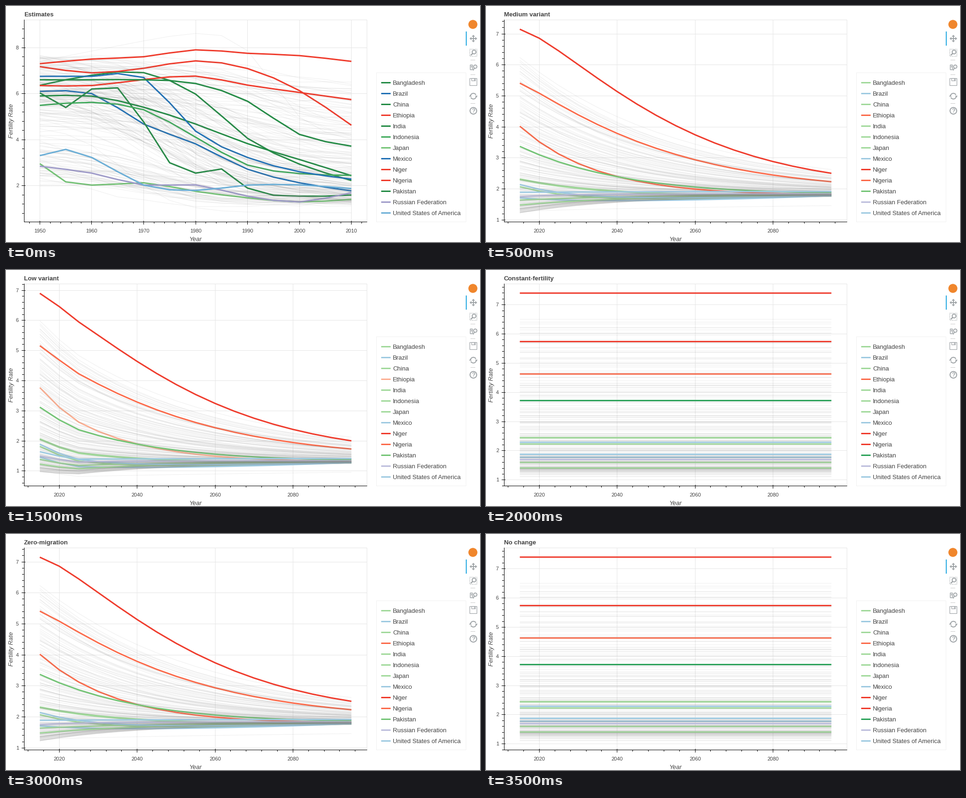
Animation, 1000 px wide and 500 px high, one loop 4000 ms. Source, as a matplotlib script:

```python
import numpy as np
import matplotlib.pyplot as plt
from matplotlib.animation import ArtistAnimation
from matplotlib.collections import LineCollection
from matplotlib.colors import to_rgba
from matplotlib.patches import Arc, Circle, Polygon, Rectangle

PAST = np.arange(1950, 2011, 5)
FUTURE = np.arange(2015, 2096, 5)
AHEAD = FUTURE - 2015
T = AHEAD / 80
TOP, RIGHT, BOTTOM = 29, 761, 457
INK, GRID, ICON = "#444444", "#e5e5e5", "#a1a6a9"
SHADES = {
    "red": ["#fee0d2", "#fcae91", "#fb6a4a", "#ef3b2c"],
    "green": ["#a1d99b", "#74c476", "#41ab5d", "#2ca25a", "#238b45"],
    "blue": ["#9ecae1", "#6baed6", "#2171b5"],
    "purple": ["#bcbddc", "#9e9ac8"],
}
KINDS = ["past", "medium", "low", "momentum", "fixed"]

plt.rcParams["font.family"] = "Liberation Sans"
fig = plt.figure(figsize=(10, 5), dpi=100, facecolor="white")
ax = fig.add_axes([0, 0, 1, 1])
ax.set(xlim=(0, 1000), ylim=(500, 0))
ax.axis("off")


# ---- rules for the curves -------------------------------------------------
def through(points):
    """Cubic Hermite curve through {year: value}, sampled every five years."""
    knots = np.array(sorted(points), float)
    v = np.array([points[k] for k in knots])
    slope = np.gradient(v, knots)
    i = np.clip(np.searchsorted(knots, PAST, "right") - 1, 0, len(knots) - 2)
    h = knots[i + 1] - knots[i]
    s = (PAST - knots[i]) / h
    return (v[i] * (1 + 2 * s) * (1 - s) ** 2 + v[i + 1] * s * s * (3 - 2 * s)
            + h * slope[i] * s * (1 - s) ** 2 - h * slope[i + 1] * s * s * (1 - s))


def settle(start, floor, tau, power=1.0):
    """Decay towards a floor, with a slow recovery from very low floors."""
    decay = np.exp(-(AHEAD / tau) ** power)
    return floor + (start - floor) * decay + max(0, 1.78 - floor) * T ** 2


def drift(start, end, year=2095):
    return np.interp(FUTURE, [2015, year], [start, end])


def logistic(years, middle, width):
    return 1 / (1 + np.exp(-(years - middle) / width))


def make_background(count=188):
    rng = np.random.default_rng(12)
    rows = []
    for u in rng.permutation((np.arange(count) + 0.5) / count):
        end = 1.22 + 1.2 * u + 4.1 * u ** 3.2 + rng.normal(0, 0.04)
        if u < 0.24:
            start = rng.uniform(2.0, 3.9)
        else:
            start = np.clip(rng.normal(6.2, 0.8), 3.4, 7.6)
        start = max(start, end + 0.3)
        drop = logistic(PAST, 1966 + 26 * u ** 1.3 + rng.normal(0, 5), rng.uniform(5, 10))
        drop = (drop - drop[0]) / (drop[-1] - drop[0])
        bump = rng.normal(0.15, 0.25) * np.sin((PAST - 1950) / 60 * np.pi)
        noise = rng.normal(0, 0.04, len(PAST)) * (PAST < 2010)
        past = np.clip(start + (end - start) * drop + bump + noise, 1.1, 8.3)

        first = max(0.95 * end + 0.06, 1.23)
        last = 1.77 + 0.05 * max(first - 2.2, 0) + abs(rng.normal(0, 0.05))
        tau = 26 + 3 * max(first - 2, 0) + rng.normal(0, 2)

        base = 2.066 + 0.63 * u ** 4.5
        bend = (base - 2.06) * rng.uniform(0, 0.12)
        rows.append(dict(name=None, past=past, medium=settle(first, last, tau),
                         momentum=base + bend * (T * T - 0.8 * T)))

    # the two outermost histories
    rows[60]["past"] = 7.4 + 0.045 * (PAST - 1950) - 6 * logistic(PAST, 1995, 4)
    rows[90].update(past=0.83 + 3.8 * logistic(PAST, 1966, -5),
                    medium=1.26 + 0.2 * T ** 0.6, momentum=drift(2.0493, 2.0493))
    return rows


countries = make_background()
featured = []


def add(name, rank, hue, levels, decades, medium, momentum, turns={}):
    """decades: one value per ten years from 1950; turns: sharp bends between."""
    points = {1950 + 10 * i: v for i, v in enumerate(decades)}
    row = dict(name=name, past=through({**points, **turns}),
               medium=settle(*medium), momentum=drift(*momentum))
    row["color"] = {k: SHADES[hue][int(n)] for k, n in zip(KINDS, levels)}
    countries.insert(rank, row)
    featured.append(row)


add("Bangladesh", 15, "green", "40000", [6.36, 6.8, 6.91, 5.98, 4.06, 2.94, 2.23],
    (2.07, 1.62, 13), (2.172, 2.184))
add("Brazil", 24, "blue", "20000", [6.1, 6.0, 4.68, 3.82, 2.72, 2.13, 1.78],
    (1.71, 1.58, 14), (2.109, 2.112))
add("China", 37, "green", "40000", [6.03, 6.2, 4.77, 2.55, 1.9, 1.55, 1.6],
    (1.64, 1.81, 30), (2.196, 2.118, 2055),
    turns={1955: 5.4, 1965: 6.25, 1975: 3.0, 1985: 2.73})
add("Ethiopia", 60, "red", "32102", [7.17, 6.9, 7.1, 7.42, 7.09, 6.13, 4.63],
    (4.02, 1.74, 20), (2.31, 2.307))
add("India", 80, "green", "40000", [5.9, 5.89, 5.41, 4.68, 3.83, 3.14, 2.44],
    (2.32, 1.74, 22), (2.288, 2.268, 2040))
add("Indonesia", 81, "green", "20000", [5.49, 5.62, 5.3, 4.11, 2.9, 2.53, 2.45],
    (2.3, 1.74, 21), (2.155, 2.161))
add("Japan", 88, "green", "10000", [2.96, 2.03, 2.13, 1.76, 1.48, 1.3, 1.41],
    (1.48, 1.79, 27), (2.072, 2.073), turns={1955: 2.17})
add("Mexico", 115, "blue", "20000", [6.75, 6.75, 6.7, 4.37, 3.23, 2.61, 2.29],
    (2.14, 1.66, 13), (2.109, 2.115))
add("Niger", 130, "red", "33303", [7.3, 7.5, 7.6, 7.9, 7.75, 7.65, 7.4],
    (7.15, 2.0, 42.4, 1.33), (2.482, 2.485))
add("Nigeria", 131, "red", "32213", [6.35, 6.35, 6.61, 6.76, 6.37, 6.05, 5.74],
    (5.41, 1.9, 37.9, 1.15), (2.711, 2.716))
add("Pakistan", 137, "green", "41103", [6.6, 6.6, 6.6, 6.44, 5.67, 4.23, 3.72],
    (3.37, 1.7, 28), (2.339, 2.33, 2040))
add("Russian Federation", 147, "purple", "10000", [2.85, 2.55, 2.03, 2.04, 1.55, 1.3, 1.7],
    (1.75, 1.84, 12), (2.103, 2.109))
add("United States of America", 190, "blue", "10000",
    [3.31, 3.23, 2.03, 1.8, 2.03, 2.04, 1.88],
    (1.89, 1.92, 40), (2.077, 2.078), turns={1955: 3.58})

# high and low variants diverge over the first ten years
SHIFT = np.interp(AHEAD, [0, 5, 10], [0.25, 0.4, 0.5])


# ---- drawing helpers ------------------------------------------------------
def segments(lines, color, width=1.0, z=1):
    """Pixel-space polylines; width is in pixels."""
    return ax.add_collection(LineCollection(
        lines, colors=color, linewidths=np.multiply(width, 0.72),
        capstyle="butt", zorder=z, snap=False), autolim=False)


def label(x, y, text, px, **kw):
    return ax.text(x, y, text, fontsize=px * 0.72, color=INK, va="baseline",
                   zorder=6, **kw)


def pixel(value):
    return np.round(value) + 0.5


def ticks(lo, hi, step):
    return np.arange(np.ceil(lo / step - 1e-9), np.floor(hi / step + 1e-9) + 1) * step


def draw_scene(title, kind, lo, hi, ystep, digits=0, shift=0):
    years = PAST if kind == "past" else FUTURE
    xstep = 10 if kind == "past" else 20
    left = 48 if digits else 38
    xpad, ypad = (years[-1] - years[0]) * 0.05, (hi - lo) * 0.05
    x0, x1, y0, y1 = years[0] - xpad, years[-1] + xpad, lo - ypad, hi + ypad

    def px(x):
        return left + (x - x0) / (x1 - x0) * (RIGHT - left)

    def py(y):
        return BOTTOM - (y - y0) / (y1 - y0) * (BOTTOM - TOP)

    xs, ys = ticks(x0, x1, xstep), ticks(y0, y1, ystep)
    gx, gy = pixel(px(xs)), pixel(py(ys))
    edge, floor = left + 0.5, BOTTOM + 0.5
    grid = [[(x, TOP), (x, BOTTOM)] for x in gx]
    grid += [[(left, y), (RIGHT, y)] for y in gy]
    grid.append([(left, TOP + 0.5), (RIGHT + 0.5, TOP + 0.5), (RIGHT + 0.5, floor)])
    axis = [[(edge, TOP), (edge, BOTTOM + 1)], [(left, floor), (RIGHT + 1, floor)]]
    axis += [[(x, BOTTOM - 2), (x, BOTTOM + 6)] for x in gx]
    axis += [[(left - 5, y), (left + 3, y)] for y in gy]
    axis += [[(x, BOTTOM), (x, BOTTOM + 4)] for x in pixel(px(ticks(x0, x1, xstep / 5)))]
    axis += [[(left - 4, y), (left, y)] for y in pixel(py(ticks(y0, y1, ystep / 5)))]

    paths, colors, widths = [], [], []
    for c in countries:
        if kind == "fixed":
            v = np.full(len(years), c["past"][-1])
        else:
            v = c["medium" if kind == "low" else kind] + shift
        paths.append(np.column_stack([px(years), py(np.clip(v, lo, hi))]) + 0.5)
        colors.append(to_rgba(c["color"][kind]) if c["name"] else (0.5, 0.5, 0.5, 0.13))
        widths.append(3 if c["name"] else 1)

    art = [segments(grid, GRID), segments(paths, colors, widths, 2),
           segments(axis, "black", 1, 3)]
    art.append(label(left, 22, title, 13.2, weight="bold"))
    art.append(label((left + RIGHT) / 2 + 1, 498.5, "Year", 13, style="italic", ha="center"))
    art.append(label(15.5, 243, "Fertility Rate", 13, style="italic", rotation=90,
                     rotation_mode="anchor", ha="center"))
    art += [label(x, 480, f"{v:.0f}", 11, ha="center") for x, v in zip(gx, xs)]
    art += [label(left - 11, y + 3.5, f"{v:.{digits}f}", 11, ha="right")
            for y, v in zip(gy, ys)]
    rows = 162.5 + 23 * np.arange(len(featured))
    art.append(segments([[(791.5, y), (811.5, y)] for y in rows],
                        [c["color"][kind] for c in featured], 3, 5))
    return art


def shape(patch, **kw):
    ax.add_patch(patch)
    patch.set(zorder=5, **kw)


def outline(patch, px=1.5, **kw):
    shape(patch, facecolor="none", edgecolor=ICON, linewidth=px * 0.72, snap=False, **kw)


def draw_legend():
    shape(Rectangle((781.5, 141.5), 189, 316), facecolor="white",
          edgecolor="#f1f1f1", linewidth=0.72, snap=False)
    for i, c in enumerate(featured):
        label(816, 167 + 23 * i, c["name"], 13)


def draw_toolbar():
    shape(Circle((985, 39), 9.5), facecolor="#f0862c", edgecolor="none")
    segments([[(971, 54), (971, 84)]], "#26aae1", 2)
    segments([[(980, y), (990, y)] for y in (114.5, 145.5, 206.5)], "#cccccc")

    # pan
    segments([[(980, 69), (992, 69)], [(986, 63), (986, 75)]], ICON, 2)
    for dx, dy in ((1, 0), (-1, 0), (0, 1), (0, -1)):
        tip = np.array([986 + 8 * dx, 69 + 8 * dy])
        back = tip - 4 * np.array([dx, dy])
        side = 3.5 * np.array([dy, dx])
        shape(Polygon([tip, back + side, back - side]), facecolor=ICON, edgecolor="none")

    # box zoom
    outline(Rectangle((978.5, 91.5), 15, 15), 1, linestyle=(0, (2, 1.5)))
    outline(Circle((987.5, 97.5), 4), 2)
    segments([[(984.5, 100.5), (980.5, 104.5)]], ICON, 2.5)

    # wheel zoom
    outline(Rectangle((979.5, 125), 4.5, 10), joinstyle="round")
    segments([[(981.8, 127), (981.8, 130)]], ICON, 1.5)
    outline(Circle((990, 128.5), 3.5), 1.8)
    segments([[(988, 131.5), (985.5, 136.5)]], ICON, 2)

    # save
    outline(Rectangle((978.5, 153.5), 15, 15), 1.2)
    outline(Rectangle((982.5, 153.5), 8, 5), 1.2)
    segments([[(988.3, 154), (988.3, 158)]], ICON, 1.5)

    # reset
    for d, start in ((1, 195), (-1, 15)):
        outline(Arc((986, 191), 12, 12, theta1=start, theta2=start + 140), 2)
        shape(Polygon([(986 + 3.5 * d, 191 - d), (986 + 9 * d, 191 - d),
                       (986 + 6.5 * d, 191 + 3 * d)]), facecolor=ICON, edgecolor="none")

    # help
    outline(Circle((986, 222), 7), 2)
    label(986, 226.2, "?", 12, weight="bold", ha="center").set_color(ICON)


draw_legend()
draw_toolbar()
scenes = [
    draw_scene("Estimates", "past", 0.83, 8.8, 2),
    draw_scene("Medium variant", "medium", 1.23, 7.153, 1),
    draw_scene("High variant", "medium", 1.48, 7.403, 1, shift=SHIFT),
    draw_scene("Low variant", "low", 0.81, 6.907, 1, shift=-SHIFT),
    draw_scene("Constant-fertility", "fixed", 1.11, 7.4, 1),
    draw_scene("Momentum", "momentum", 2.0493, 2.717, 0.1, digits=1),
    draw_scene("Zero-migration", "medium", 1.23, 7.153, 1),
    draw_scene("No change", "fixed", 1.11, 7.4, 1),
]

animation = ArtistAnimation(fig, scenes, interval=500, repeat=True, repeat_delay=0)
plt.show()
```
